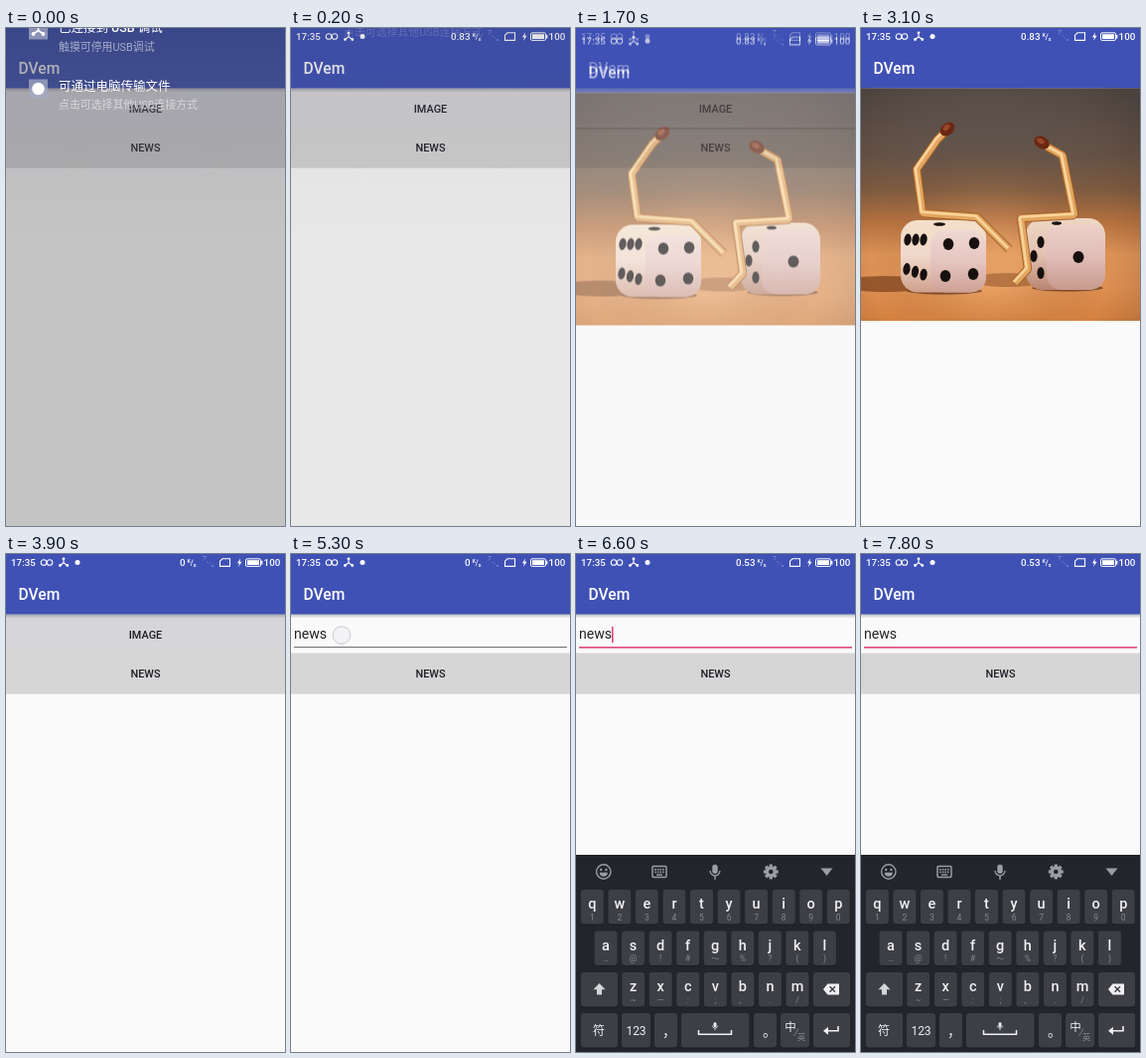
An HTML page with a canvas for the animation above (8 s loop, 281 px wide and 500 px high).

```html
<!DOCTYPE html>
<html lang="zh-CN">
<head>
<meta charset="utf-8">
<title>Phone demo</title>
<style>
html, body { margin: 0; width: 100%; height: 100%; overflow: hidden; background: #fafafa; }
canvas { display: block; width: 281px; height: 500px; }
</style>
</head>
<body>
<canvas id="stage"></canvas>
<script>
const W = 281, H = 500, LOOP = 8000;
const LATIN = 'Roboto, "Noto Sans CJK SC", "Noto Sans CJK", sans-serif';
const CJK = '"Noto Sans CJK SC", "Noto Sans CJK", sans-serif';
const dpr = window.devicePixelRatio || 1;

function sized(el) {
  el.width = Math.round(W * dpr);
  el.height = Math.round(H * dpr);
  const c = el.getContext('2d');
  c.scale(dpr, dpr);
  return c;
}
const main = sized(document.getElementById('stage'));
const layer = document.createElement('canvas');
const off = sized(layer);
let g = main;

const clamp = v => Math.max(0, Math.min(1, v));
const phase = (t, from, len) => clamp((t - from) / len);

function rect(x, y, w, h, fill) {
  g.fillStyle = fill;
  g.fillRect(x, y, w, h);
}
function rounded(x, y, w, h, r, fill) {
  g.beginPath();
  g.roundRect(x, y, w, h, r);
  g.fillStyle = fill;
  g.fill();
}
function oval(x, y, rx, ry, fill, rot = 0) {
  g.beginPath();
  g.ellipse(x, y, rx, ry, rot, 0, 7);
  g.fillStyle = fill;
  g.fill();
}
const dot = (x, y, r, fill) => oval(x, y, r, r, fill);
function ring(x, y, r, color, width) {
  g.beginPath();
  g.arc(x, y, r, 0, 7);
  g.strokeStyle = color;
  g.lineWidth = width;
  g.stroke();
}
function trace(pts, close) {
  g.beginPath();
  for (let i = 0; i < pts.length; i += 2) g.lineTo(pts[i], pts[i + 1]);
  if (close) g.closePath();
}
function line(pts, color, width, close) {
  trace(pts, close);
  g.strokeStyle = color;
  g.lineWidth = width;
  g.stroke();
}
function poly(pts, fill) {
  trace(pts, true);
  g.fillStyle = fill;
  g.fill();
}
function text(s, x, y, size, color, align = 'left', weight = 400, family = LATIN) {
  g.font = `${weight} ${size}px ${family}`;
  g.textAlign = align;
  g.fillStyle = color;
  g.fillText(s, x, y);
}
function fade(y0, y1, stops) {
  const grad = g.createLinearGradient(0, y0, 0, y1);
  stops.forEach((s, i) => grad.addColorStop(i / (stops.length - 1), s));
  return grad;
}

function statusBar(speed) {
  text('17:35', 5, 12.2, 9.8, '#fff', 'left', 500);
  ring(38, 8.5, 2.8, '#fff', 1.1);
  ring(44, 8.5, 2.8, '#fff', 1.1);
  for (const [x, y] of [[58, 4.8], [54.5, 11.5], [61.8, 11.5]]) {
    line([58, 8.8, x, y], '#fff', 1.1);
    dot(x, y, 1.4, '#fff');
  }
  dot(72, 8.5, 2.5, '#fff');

  text(speed, 180.5, 12.2, 9.8, '#fff', 'right', 500);
  text('K', 182.5, 9, 5.5, '#fff', 'left', 500);
  line([186, 12, 188.2, 5.5], '#fff', 0.7);
  text('s', 188.4, 12.6, 6, '#fff', 'left', 500);

  const dim = '#7b87cb';
  line([198, 2.5, 201.5, 2.5, 199, 6.5], dim, 0.8);
  dot(203, 8, 0.7, dim);
  dot(205.3, 9.8, 0.6, dim);
  dot(208, 12, 0.8, '#aab2de');

  line([218, 4.8, 225.5, 4.8, 225.5, 12.4, 215.5, 12.4, 215.5, 7.2], '#fff', 1.1, true);
  poly([236, 4.2, 233, 9.2, 235, 9.2, 234, 13, 237.6, 7.8, 235.4, 7.8], '#fff');
  g.beginPath();
  g.roundRect(241.5, 4.8, 15, 7.6, 1.3);
  g.strokeStyle = '#fff';
  g.lineWidth = 1;
  g.stroke();
  rect(243, 6.2, 12, 4.8, '#fff');
  rect(257, 6.8, 1.4, 3.6, '#fff');
  text('100', 259.6, 12.2, 9.8, '#fff', 'left', 500);
}

function frame(t, speed) {
  rect(0, 60.6, W, 4, fade(60.6, 64.6, ['rgba(0,0,0,.24)', 'rgba(0,0,0,0)']));
  rect(0, 0, W, 60.6, '#3f51b5');
  text('DVem', 12.5, 45.5, 15.6, '#fff', 'left', 500);
  if (t >= 200) statusBar(speed);
}

function button(y, h, fill) {
  rect(0, y, W, h, fill);
  rect(0, y + h, W, 2, fade(y + h, y + h + 2, ['rgba(0,0,0,.16)', 'rgba(0,0,0,0)']));
}
const label = (s, y) => text(s, 140.5, y, 10.9, '#1d1d26', 'center', 500);

function touch(x, y) {
  dot(x, y, 9, 'rgba(240,240,245,.6)');
  ring(x, y, 8.8, 'rgba(170,172,186,.6)', 1);
}

// Ripple inside a button, growing from the tap
function ripple(x, y, top, age) {
  if (age < 0 || age > 400) return;
  g.save();
  g.beginPath();
  g.rect(0, top, W, 39);
  g.clip();
  dot(x, y, 12 + age * 0.2 + Math.max(0, age - 100) * 0.5,
    `rgba(0,0,0,${0.07 * (1 - phase(age, 200, 200))})`);
  g.restore();
}

function homeScreen(t, speed) {
  rect(0, 0, W, H, '#fafafa');
  button(99.5, 40, '#d6d6d6');
  rect(0, 60.5, W, 39.5, '#d6d5d8');
  const pressed = t >= 1300 && t < 1800;
  if (pressed) rect(0, 100, W, 3, fade(100, 103, ['rgba(0,0,0,.24)', 'rgba(0,0,0,0)']));
  ripple(119, 82, 61, t - 1300);
  ripple(119, 121, 100, t - 4200);
  label('IMAGE', 85);
  label('NEWS', 124);
  frame(t, speed);
  if (t >= 1300 && t < 1500) touch(115.5, 82.5);
  if (t >= 4200 && t < 4400) touch(115.5, 121);
}

function match(pts, headX, headY, rot) {
  g.lineJoin = 'bevel';
  line(pts, '#a3622a', 8.5);
  line(pts, '#e3a660', 6.5);
  line(pts.map(v => v - 1.2), '#f8d49a', 2.6);
  g.lineJoin = 'miter';
  oval(headX, headY, 8.2, 6, '#6b2713', rot);
  oval(headX - 1, headY - 1.5, 4, 2.5, '#96472a', rot);
}

function photo() {
  g.save();
  g.beginPath();
  g.rect(0, 60.6, W, 233.4);
  g.clip();
  rect(0, 60, W, 234, fade(61, 294,
    ['#57504d', '#5c524d', '#64544a', '#7c5a41', '#b3703f', '#dc9256', '#dd8f52', '#d4813f']));
  const glow = g.createRadialGradient(130, 235, 30, 130, 220, 210);
  glow.addColorStop(0, 'rgba(255,195,135,.28)');
  glow.addColorStop(0.5, 'rgba(120,70,35,0)');
  glow.addColorStop(1, 'rgba(50,35,30,.35)');
  rect(0, 60, W, 234, glow);
  oval(25, 257, 45, 8, 'rgba(95,42,14,.55)');
  oval(148, 253, 38, 7, 'rgba(95,42,14,.35)');
  oval(84, 264, 38, 3.5, 'rgba(70,30,12,.6)');
  oval(208, 261, 36, 3.5, 'rgba(70,30,12,.6)');

  const ink = '#17100f';
  rounded(40, 193, 86, 72.5, 17, fade(193, 265, ['#f3dfc8', '#f0d8cb', '#cfa18d']));
  rounded(70, 203, 56, 62.5, 15, fade(203, 265, ['#f0d8d2', '#e6c6c1', '#cfa195']));
  for (const [x, y] of [[88, 217], [114, 216], [85, 249], [113, 247]]) oval(x, y, 5.3, 6, ink);
  for (let i = 0; i < 3; i++) {
    oval(47 + 8 * i, 212.5, 3.6, 6, ink, 0.15);
    oval(46 + 8.5 * i, 242 + 2.8 * i, 3.6, 6, ink, 0.15);
  }
  oval(79, 197, 6, 1.8, ink);

  rounded(166, 191, 80, 72, 17, fade(191, 263, ['#eed7c2', '#e2c2b3', '#b98570']));
  rounded(187, 197, 59, 66, 15, fade(197, 263, ['#ecd0c9', '#e0bdb7', '#c8998c']));
  oval(219, 230, 5.5, 6, ink);
  for (const [x, y] of [[181, 215], [174, 229], [181, 246]]) oval(x, y, 3.6, 6, ink);
  oval(197, 196, 5, 1.8, ink);

  match([84, 105, 77, 112, 56, 142, 62, 186, 117, 190, 149, 222], 87, 101.5, -0.7);
  match([187, 119, 203, 128, 215, 188, 161, 191, 168, 242, 155, 256], 182, 115, 0.5);
  g.restore();
}

function photoScreen(t, speed) {
  rect(0, 0, W, H, '#fafafa');
  frame(t, speed);
  photo();
}

const KEY = '#3d3f45', GREY = '#9b9da3', WHITE = '#f0f0f3', BOARD = '#23252c';

function key(x, y, w) {
  rounded(x, y + 1, w, 34.5, 3, '#1a1c21');
  rounded(x, y, w, 34.5, 3, KEY);
}
function letters(row, hints, x0, y) {
  [...row].forEach((ch, i) => {
    const x = x0 + i * 27.55;
    key(x - 11.5, y, 23);
    text(ch, x, y + 19, 14.5, WHITE, 'center', 500);
    text([...hints][i], x, y + 30.5, 8.5, '#85878f', 'center');
  });
}
function mic(x, y, s, color) {
  rounded(x - 2.6 * s, y - 7 * s, 5.2 * s, 9 * s, 2.6 * s, color);
  g.beginPath();
  g.arc(x, y - s, 4.7 * s, 0, Math.PI);
  g.strokeStyle = color;
  g.lineWidth = 1.3 * s;
  g.stroke();
  rect(x - 0.7 * s, y + 3.5 * s, 1.4 * s, 4 * s, color);
}

function toolbar() {
  ring(27.8, 319, 7.2, GREY, 1.4);
  dot(25.2, 317, 1.2, GREY);
  dot(30.4, 317, 1.2, GREY);
  g.beginPath();
  g.arc(27.8, 319.8, 4, 0, Math.PI);
  g.fillStyle = GREY;
  g.fill();

  g.beginPath();
  g.roundRect(77, 313.5, 14, 11, 1);
  g.strokeStyle = GREY;
  g.lineWidth = 1.5;
  g.stroke();
  for (let i = 0; i < 8; i++) rect(79.2 + (i % 4) * 2.6, 316 + (i >> 2) * 2.6, 1.6, 1.6, GREY);
  rect(81, 321.4, 6, 1.4, GREY);

  mic(140, 319, 1.05, GREY);

  for (let i = 0; i < 4; i++) {
    g.save();
    g.translate(196.3, 319);
    g.rotate(i * Math.PI / 4);
    rect(-1.7, -7.4, 3.4, 14.8, GREY);
    g.restore();
  }
  dot(196.3, 319, 5.5, GREY);
  dot(196.3, 319, 2.3, BOARD);
  poly([246.5, 315.5, 258.5, 315.5, 252.5, 323], GREY);
}

function keyboard(t) {
  const drop = 198 * (1 - phase(t, 5300, 430)) ** 2;
  g.save();
  g.translate(0, drop);
  rect(0, 302, W, 200, BOARD);
  toolbar();
  letters('qwertyuiop', '1234567890', 16.3, 337);
  letters('asdfghjkl', '…@!#～%?()', 30, 378.5);
  letters('zxcvbnm', '~—:;、./', 57.7, 420);

  key(5, 420, 37);
  poly([23.5, 431, 29.5, 437.3, 26, 437.3, 26, 442.5, 21, 442.5, 21, 437.3, 17.5, 437.3], '#d4d5d8');
  key(239, 420, 37);
  poly([249, 437, 253.5, 431.5, 265, 431.5, 265, 442.5, 253.5, 442.5], WHITE);
  line([255.5, 434.2, 261, 439.8], KEY, 1.4);
  line([261, 434.2, 255.5, 439.8], KEY, 1.4);

  for (const [x, w] of [[5, 37], [46, 29], [79, 23], [106, 68.5], [179, 23], [206, 29], [239, 37]]) key(x, 461, w);
  text('符', 23, 483, 12, WHITE, 'center', 400, CJK);
  text('123', 60.5, 483, 12, WHITE, 'center');
  text('，', 94, 484, 14, WHITE, 'center', 400, CJK);
  text('。', 195, 484, 14, WHITE, 'center', 400, CJK);
  text('中', 216, 479, 11.5, WHITE, 'center', 400, CJK);
  line([219.5, 484, 224, 476.5], '#85878f', 0.8);
  text('英', 227, 488, 8.5, '#85878f', 'center', 400, CJK);
  line([264, 474, 264, 478.7, 251, 478.7], WHITE, 1.6);
  poly([249, 478.7, 254, 474.7, 254, 482.7], WHITE);

  const swap = phase(t, 6100, 200);
  g.globalAlpha = 1 - swap;
  text('拼音', 140, 483, 11.7, WHITE, 'center', 400, CJK);
  g.globalAlpha = swap;
  mic(140, 474, 0.55, WHITE);
  line([123.5, 478, 123.5, 482.3, 156.5, 482.3, 156.5, 478], WHITE, 1.5);
  g.restore();
}

function newsScreen(t, speed) {
  rect(0, 0, W, H, '#fafafa');
  button(99.5, 40, '#d6d6d6');
  label('NEWS', 124);
  frame(t, speed);
  text('news', 3, 85.2, 14.1, '#212121');
  const focus = t >= 5400;
  if (focus) rect(3, 93, 275, 1.6, '#e0487c');
  else rect(3, 93, 275, 1, '#707074');
  const blinkOn = Math.floor((t - 5300) / 500) % 2 === 0;
  if (focus && blinkOn) rect(36, 73, 1.6, 16, '#e0487c');
  if (t >= 5200 && t < 5400) touch(51, 81.5);
  if (focus) keyboard(t);
}

// Notification panel sliding away over the home screen
function shade(t) {
  if (t >= 300) return;
  const p = t / 300;
  g.save();
  g.globalAlpha = 1 - p;
  rect(0, 0, W, H, 'rgba(0,0,0,.215)');
  rect(0, 0, W, 60.6, fade(0, 61, ['rgba(95,98,120,.2)', 'rgba(105,112,140,.28)']));
  rect(0, 60.6, W, 160, fade(61, 221, ['rgba(163,163,182,.28)', 'rgba(175,175,185,0)']));
  g.translate(0, -110 * p);
  const note = (y, title, sub) => {
    rect(23, y - 7, 19, 18.5, 'rgba(165,170,195,.75)');
    text(title, 53, y + 4, 12.5, '#fff', 'left', 500);
    text(sub, 53, y + 22.7, 10.9, 'rgba(255,255,255,.55)');
  };
  note(0, '已连接到 USB 调试', '触摸可停用USB调试');
  for (const [x, y] of [[32.5, -3], [27.5, 6], [37.5, 6]]) {
    line([32.5, 2.5, x, y], '#fff', 1.6);
    dot(x, y, 1.9, '#fff');
  }
  note(58.5, '可通过电脑传输文件', '点击可选择其他USB连接方式');
  dot(32.5, 61, 6.2, '#fff');
  g.restore();
}

function over(screen, t, speed, alpha, dy) {
  g = off;
  screen(t, speed);
  g = main;
  g.globalAlpha = alpha;
  g.drawImage(layer, 0, dy, W, H);
  g.globalAlpha = 1;
}

function draw(t) {
  g = main;
  const speed = t < 3600 ? '0.83' : t < 6200 ? '0' : '0.53';
  if (t >= 4800) return newsScreen(t, speed);
  if (t >= 1800 && t <= 3100) return photoScreen(t, speed);
  homeScreen(t, speed);
  shade(t);
  const open = t < 1800 ? phase(t, 1500, 300) : phase(t, 4500, 300);
  const lift = 40 * (1 - open) ** 2;
  if (t < 1800 && open > 0) over(photoScreen, t, speed, open, lift);
  else if (t > 3100 && t < 3400) over(photoScreen, t, speed, 1 - phase(t, 3100, 300), 0);
  else if (t > 4500) over(newsScreen, t, speed, open, lift);
}

const start = performance.now();
function tick() {
  const ms = Math.max(0, performance.now() - start) % LOOP;
  draw(Math.floor(ms / 100) * 100);
  requestAnimationFrame(tick);
}
tick();
</script>
</body>
</html>
```
